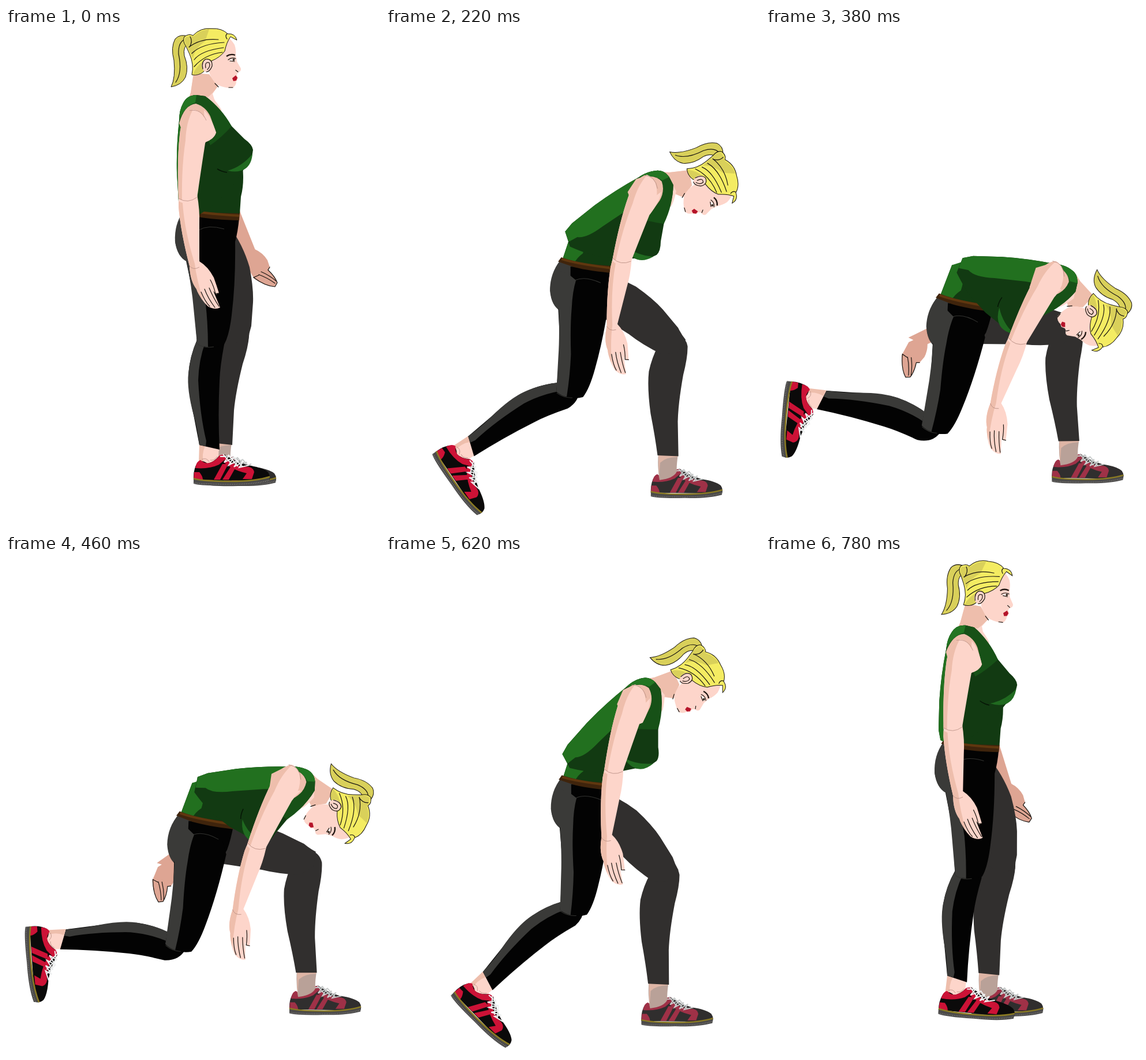
Recreate the animation shown at these times as an HTML page. Size 648 px wide and 864 px high, loop 0.8 s.

```html
<!DOCTYPE html>
<html lang="en">
<head>
<meta charset="utf-8">
<title>Lunge</title>
<style>
html, body { margin: 0; height: 100%; overflow: hidden; background: #fff; }
svg { display: block; width: 100vw; height: 100vh; --red: #cc1236; --black: #0b0a0a; --lace: #eef0f0; }
.skin { fill: #fdd5ca; } .shade { fill: #eebeac; } .dim { fill: #dea593; }
.far { fill: #312f2e; } .grey { fill: #3a3a38; } .black { fill: #030303; }
.dark { fill: #123a12; } .green { fill: #22701f; } .mid { fill: #175117; }
.hair { fill: #f4ec62; } .hairshade { fill: #d9d05a; }
.line { fill: none; stroke: #191511; stroke-width: 1.2; stroke-linecap: round; }
.soft { fill: none; stroke: #b98f84; stroke-width: .8; }
.red { fill: var(--red); } .upper { fill: var(--black); }
.dull { --red: #9f3147; --black: #302e2e; --lace: #c9cccc; }
</style>
</head>
<body>
<!-- data-turn: degrees per ms, pivot x, pivot y -->
<svg viewBox="0 0 648 864">
<defs>
  <g id="shoe">
    <path class="upper" d="M328 782Q327 764 335 752Q343 747 352 754Q363 752 372 741L381 738Q398 750 421 757Q448 761 457 769Q462 776 459 784Z"/>
    <path class="red" d="M329 769L338 769Q344 776 344 782H328ZM331 762Q333 750 340 748Q347 755 356 753Q367 749 373 740L381 738L385 745L372 756Q355 764 331 762ZM378 755H388L374 782H363ZM394 757H403L389 782H378ZM383 746Q402 760 424 760Q432 762 433 769L429 781H413L420 771Q397 766 380 752Z"/>
    <path d="M328 779Q345 785 392 785Q435 786 460 776L459 786Q435 793 390 792Q340 793 328 789Z" fill="#4b4a49"/>
    <path d="M328 780Q345 785 392 785Q435 785 460 777" fill="none" stroke="#8b7b22" stroke-width="2.5"/>
    <path d="M329 788Q350 790 392 790Q437 790 459 783" fill="none" stroke="#858382" stroke-width="2" stroke-dasharray="1 2"/>
    <path d="M374 742L389 741L381 752L397 744L389 757L406 748L398 760L414 751L407 761L424 757M379 738L394 755M388 739L405 759M398 743L413 760" fill="none" stroke="var(--lace)" stroke-width="2"/>
  </g>
</defs>
<g id="body">

  <g data-turn=".25 363 306"><g data-turn="-.02 325 170">
    <g data-turn="-.075 425 395">
      <path class="dim" d="M419 392L431 383Q445 389 453 402L457 414L454 419Q466 430 470 441L466 448Q448 446 430 434L417 412Z"/>
      <path class="line" d="M457 414L454 419Q466 430 470 441L466 448Q449 447 429 432L438 428M438 427Q452 432 466 442M442 422Q456 428 468 438"/>
    </g>
    <path class="dim" d="M310 160L345 155L383 250L407 322L433 387L418 414L398 368L352 275Z"/>
  </g></g>

  <g data-turn="-.2 365 362">
    <g data-turn=".182 394 533">
      <g data-turn=".018 374 725" class="dull">
        <use href="#shoe" transform="translate(343 793) scale(.94) translate(-327 -792)"/>
        <path d="M357 716L391 718Q388 738 389 747Q384 759 359 762Q355 738 357 716Z" fill="#b9a198"/>
        <path class="shade" d="M357 716L391 718L390 722Q370 722 360 732L358 760Z" opacity=".7"/>
      </g>
      <path class="far" d="M372 525Q376 506 400 508Q419 515 421 533Q420 552 410 582Q398 630 395 662L392 722L356 718Q354 685 349 645Q346 600 351 572Q358 548 370 529Z"/>
    </g>
    <path class="far" d="M335 350Q355 330 388 345Q410 374 422 414Q429 450 428 475L425 516Q421 528 420 540L394 546L373 530Q360 495 356 465L338 390Z"/>
  </g>

  <g data-turn=".25 363 306"><g data-turn=".09 324 122">
    <path class="skin" d="M325 80L320 112L314 130L330 160L374 146Q362 130 358 114L370 96Z"/>
    <path class="shade" d="M325 78L320 112L314 130L325 135Q350 125 367 101L352 80Z"/>
    <path class="skin" d="M378 12Q389 17 396 29Q399 38 398 47L400 58L407 70Q408 75 402 77L400 81L402 87L399 92Q399 100 392 104Q378 104 366 98Q354 88 351 72L348 45Z"/>
    <path class="line" d="M362 96L368 102M386 103L393 103M398 73L402 76"/>
    <path d="M392 87L398 82L401 86L399 91L394 92Z" fill="#b5142a"/>
    <path d="M382 49Q389 44 397 47" fill="none" stroke="#211713" stroke-width="2.4"/>
    <path d="M387 56L396 52L397 57Z" fill="#fff"/>
    <path class="line" d="M385 55Q391 50 398 53M388 57L396 58"/>
    <circle cx="394.500" cy="55" r="2" fill="#3b2b21"/>
    <path class="hairshade" stroke="#191511" d="M317 15Q302 9 293 19Q285 34 291 56Q294 86 286 102Q304 99 311 85Q317 68 309 48Q306 32 317 26Z"/>
    <path class="line" d="M311 19Q298 24 299 45Q306 77 294 94" stroke-width=".8"/>
    <path class="hair" stroke="#191511" d="M312 32Q305 22 309 15Q317 9 324 13Q337-1 356 1Q374 0 384 10Q397 9 400 21L389 15Q382 25 379 40Q371 51 356 57L342 76Q333 83 322 81Q326 63 318 45Z"/>
    <path class="hairshade" d="M312 30Q308 20 311 16Q321 13 326 14Q337 3 352 2L345 23Q327 35 324 53L320 45ZM324 80Q329 67 340 59L343 74Q333 82 324 80Z"/>
    <path class="line" d="M317 33Q338 17 368 20M322 44Q339 27 378 25M326 55Q338 39 377 34M326 67Q344 46 375 42M383 10Q379 14 383 19M319 15Q324 23 318 33"/>
    <ellipse class="skin" cx="348" cy="65" rx="9" ry="11"/>
    <path class="line" d="M341 71Q338 58 346 54Q358 53 357 66Q353 76 347 76M346 69Q344 58 352 60Q355 66 349 72" stroke-width=".8"/>
  </g></g>

  <g data-turn=".016 345 370">
    <path class="grey" d="M308 316Q291 340 293 370Q297 396 313 404L345 390L340 320Z"/>
    <path class="black" d="M326 326L404 328Q402 352 397 370L386 392L330 398Z"/>
  </g>

  <g data-turn=".04 345 370">
    <g data-turn=".235 342 536">
      <g data-turn="-.025 352 725">
        <path class="skin" d="M335 718L370 725Q366 742 371 748L352 764L334 753Q338 738 335 718Z"/>
        <path class="shade" d="M335 720L345 724Q338 738 343 755L334 753Z"/>
        <path class="soft" d="M339 747Q347 743 352 751M354 748Q360 750 366 742"/>
        <use href="#shoe" x="-3"/>
      </g>
      <path class="black" d="M331 540Q335 516 356 513Q377 522 378 548Q371 585 370 610Q367 670 370 730L335 722L325 670Q315 625 316 600Q318 570 331 540Z"/>
      <path class="grey" d="M331 540L345 545Q334 575 333 610Q336 670 347 715L346 724L335 722Q331 690 325 670Q313 625 316 598Q319 566 331 540Z"/>
    </g>
    <path class="black" d="M313 350Q345 330 385 349L397 370Q398 440 391 497Q387 532 378 548Q356 558 331 546Q328 500 323 455L312 403Z"/>
    <path class="grey" d="M303 338Q292 355 293 370Q297 396 313 404Q322 450 325 485L331 546Q341 552 350 552Q350 515 346 478Q337 430 335 398Q332 370 335 350L318 340Z"/>
    <path d="M334 350Q350 340 378 348M332 548Q345 555 360 552" fill="none" stroke="#333330"/>
  </g>

  <g data-turn=".016 345 370">
    <path class="dark" d="M311 316L326 260L410 240Q413 270 407 292L405 322Q360 326 311 316Z"/>
    <path class="green" d="M311 316L326 260L349 250Q350 285 346 302Q336 310 332 320Z"/>
    <path d="M309 311Q333 318 365 320L405 321L404 333Q360 332 333 327L304 319Z" fill="#3f240c"/>
    <path d="M310 314Q335 321 404 325" fill="none" stroke="#60370f" stroke-width="4"/>
  </g>

  <g data-turn=".25 363 306">
    <path class="skin" d="M335 118L357 120Q368 132 373 141L375 160L340 150Z"/>
    <path class="dark" d="M330 116Q314 116 307 130Q300 142 300 160Q295 205 296 250L299 300L304 318L330 326Q360 308 374 293L395 270L411 246Q425 236 428 211Q427 202 413 192L386 165Q367 133 345 118Z"/>
    <path class="green" d="M300 160Q295 205 296 250L299 300L304 318L322 323L324 306Q335 295 334 260L335 205L340 150Z"/>
    <path class="mid" d="M330 116Q314 116 307 130Q300 142 300 165L340 170L354 203Q373 190 391 170Q373 138 345 118Z"/>
    <path d="M330 116Q314 116 307 130Q300 142 300 160Q309 136 328 129Z" fill="#237522"/>
    <path d="M384 247Q409 240 427 218Q425 242 407 247Q397 250 384 247Z" fill="#206a20"/>
    <path d="M366 244Q374 249 383 250" fill="none" stroke="#061506" stroke-width="1.500"/>
    <path class="shade" d="M300 165Q309 133 329 131Q346 136 354 153L364 181Q361 192 344 198L310 190Z"/>
    <path class="skin" d="M343 142Q355 153 364 181Q361 192 345 198Z"/>

    <g data-turn="-.19 320 168">
      <g data-turn=".005 315 297">
        <path class="skin" d="M299 288L331 288Q336 315 335 340L335 404Q350 413 360 432Q365 446 369 459L364 461L359 455Q367 474 371 484Q362 489 350 482Q337 470 330 452Q319 438 318 412Q303 355 299 310Z"/>
        <path class="shade" d="M299 300L306 303Q309 350 327 408Q330 435 342 472Q331 458 330 452Q319 438 318 412Q303 355 299 310Z"/>
        <path class="soft" d="M318 412Q325 420 335 414"/>
        <path class="line" d="M354 436Q360 447 363 460L369 459M344 452Q350 468 362 484M338 457Q345 474 353 482M352 450Q359 467 369 482" stroke-width=".9"/>
      </g>
      <path class="skin" d="M299 297Q296 230 301 185Q304 150 324 141Q345 144 349 175Q349 190 345 200Q338 245 331 294Q315 304 299 297Z"/>
      <path class="shade" d="M299 296Q296 230 301 185Q304 150 324 141Q312 163 311 195Q304 240 305 298Z"/>
      <path class="soft" d="M299 295Q315 305 331 293M318 143Q338 139 347 160"/>
    </g>
  </g>
</g>
</svg>
<script>
const STEP = 20, HALF = 400;
const body = document.getElementById('body');
const joints = [...document.querySelectorAll('[data-turn]')].map(el => {
  const [rate, x, y] = el.dataset.turn.split(' ').map(Number);
  return { el, rate, x, y };
});

function draw(now) {
  const time = Math.floor(now % (2 * HALF) / STEP) * STEP;
  const phase = HALF - Math.abs(HALF - time); // down, then back up
  body.setAttribute('transform', `translate(${-.041 * phase} ${.4 * phase})`);
  for (const { el, rate, x, y } of joints)
    el.setAttribute('transform', `rotate(${rate * phase} ${x} ${y})`);
}

const start = performance.now();
function tick() {
  draw(performance.now() - start);
  requestAnimationFrame(tick);
}
tick();
</script>
</body>
</html>
```
